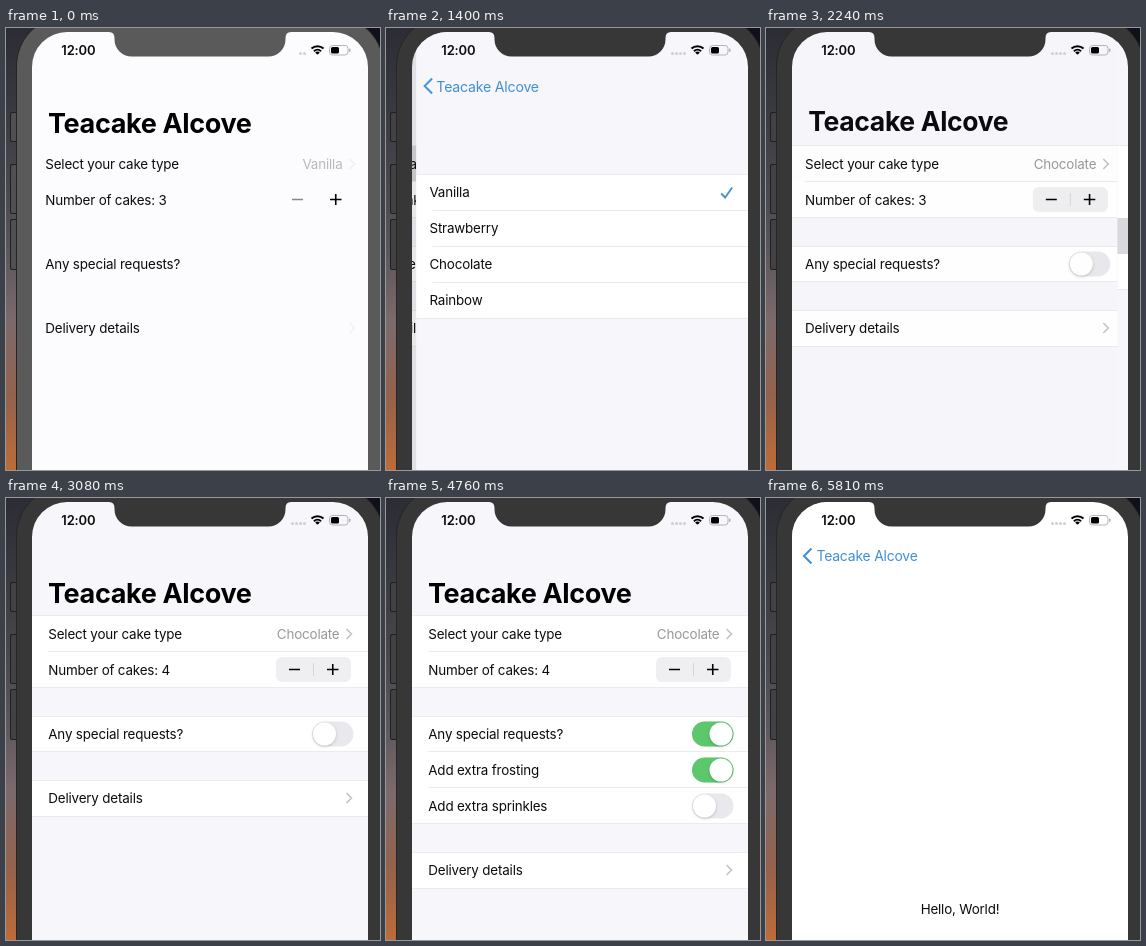
An HTML page with a canvas that plays this animation: 374x442 px, repeating every 5.95 s.

```html
<!DOCTYPE html>
<html lang="en">
<head>
<meta charset="utf-8">
<title>Order form demo</title>
<style>
html, body { margin: 0; width: 100%; height: 100%; overflow: hidden; }
canvas { display: block; }
</style>
</head>
<body>
<canvas id="stage" width="374" height="442"></canvas>
<script>
const ctx = document.getElementById('stage').getContext('2d');
const LOOP = 5950, STEP = 70;
const LEFT = 26, TOP = 4, WIDTH = 336, RIGHT = LEFT + WIDTH;
const TITLE = 'Teacake Alcove', FLAVOURS = ['Vanilla', 'Strawberry', 'Chocolate', 'Rainbow'];
const BLUE = '#3f8fd4', GROUPED = '#f7f6fb', LINE = '#ebeaee', SELECTED = '#d9d8dd';

const mix = (a, b, k) => a + (b - a) * k;
const clamp = v => Math.max(0, Math.min(1, v));
const ease = v => { v = clamp(v); return v * v * (3 - 2 * v); };
// Critically damped slide used by page transitions
const slide = ms => ms <= 0 ? 0 : ms >= 520 ? 1 : Math.min(1, 1.009 * (1 - (1 + .013 * ms) * Math.exp(-.013 * ms)));

function rect(x, y, w, h, color) {
  ctx.fillStyle = color;
  ctx.fillRect(x, y, w, h);
}

function pill(x, y, w, h, r, color) {
  ctx.fillStyle = color;
  ctx.beginPath();
  ctx.roundRect(x, y, w, h, r);
  ctx.fill();
}

function line(points, color, width) {
  ctx.strokeStyle = color;
  ctx.lineWidth = width;
  ctx.beginPath();
  points.forEach(([x, y]) => ctx.lineTo(x, y));
  ctx.stroke();
}

// y is the middle of the capital letters
function text(str, x, y, { size = 13.4, weight = 400, color = '#0c0c0c', align = 'left' } = {}) {
  ctx.font = `${weight} ${size}px Inter, sans-serif`;
  ctx.letterSpacing = `${-.013 * size}px`;
  ctx.textAlign = align;
  ctx.fillStyle = color;
  ctx.fillText(str, x, y + .364 * size);
}

function faded(alpha, draw) {
  ctx.save();
  ctx.globalAlpha *= clamp(alpha);
  draw();
  ctx.restore();
}

function section(y, h) {
  rect(LEFT, y - 1, WIDTH, h + 2, LINE);
  rect(LEFT, y, WIDTH, h, '#fff');
}

const divider = y => rect(42, y, RIGHT - 42, 1, LINE);
const chevron = (x, y, color) => line([[x - 2.5, y - 5], [x + 2.5, y], [x - 2.5, y + 5]], color, 1.6);

function toggle(y, on) {
  pill(306, y - 12.5, 41.5, 25, 12.5, '#e9e8ec');
  faded(on, () => pill(306, y - 12.5, 41.5, 25, 12.5, '#5dc76c'));
  ctx.save();
  ctx.shadowColor = 'rgba(0,0,0,.2)';
  ctx.shadowBlur = 3;
  ctx.shadowOffsetY = 1;
  pill(mix(307, 323.5, on), y - 11.5, 23, 23, 11.5, '#fff');
  ctx.restore();
}

function stepper(dx, flat, press) {
  if (!flat) {
    pill(270, 159, 75, 25, 6, '#efeff1');
    faded(press, () => pill(307.5, 159, 37.5, 25, [0, 6, 6, 0], '#d2d2d6'));
    rect(307, 165, 1, 13, '#d4d4d8');
  }
  line([[283 + dx, 171.5], [294 + dx, 171.5]], flat ? '#888' : '#000', 1.5);
  line([[321 + dx, 171.5], [332.5 + dx, 171.5]], '#000', 1.6);
  line([[326.75 + dx, 166], [326.75 + dx, 177]], '#000', 1.6);
}

function orderPage(t, flat, p) {
  const dx = flat ? 3 : 0, x = 42.3 - dx, grow = ease((t - 3500) / 400);
  const detailsY = 300 + 72 * grow, arrow = flat ? '#f0f0f3' : '#c4c4c8';
  rect(LEFT, TOP, WIDTH, 442, flat ? '#fcfcfe' : GROUPED);
  if (!flat) {
    section(118, 71);
    section(219, 34 + 72 * grow);
    section(detailsY - 17, 35);
    const picked = t < 1820 ? 1 : t < 2400 ? p : 0;
    faded(picked, () => rect(LEFT, 118, WIDTH, 35, SELECTED));
    if (t >= 5110) rect(LEFT, 354, WIDTH, 36, SELECTED);
    divider(153);
  }
  text('Select your cake type', x, 136);
  text(FLAVOURS[t < 1820 ? 0 : 2], 333.5 + dx, 136, { color: flat ? '#b8b8bc' : '#98989d', align: 'right' });
  chevron(343 + dx, 136, arrow);
  text('Number of cakes: ' + (t < 2870 ? 3 : 4), x, 172);
  stepper(dx, flat, t < 2870 ? 0 : 1 - (t - 2870) / 210);
  text('Any special requests?', x, 236);
  if (!flat) toggle(236, ease((t - 3450) / 280));

  if (grow) {
    ctx.save();
    ctx.beginPath();
    ctx.rect(LEFT, 218, WIDTH, 36 + 72 * grow);
    ctx.clip();
    faded(grow, () => {
      divider(253);
      divider(289);
      text('Add extra frosting', x, 272);
      text('Add extra sprinkles', x, 308);
      toggle(272, ease((t - 4080) / 300));
      toggle(308, 0);
    });
    ctx.restore();
  }
  text('Delivery details', x, detailsY);
  chevron(343 + dx, detailsY, arrow);
}

function flavourPage(t) {
  const settled = t >= 1540, top = settled ? 118 : 147, x = settled ? 42.5 : 39.3;
  const chosen = t < 1820 ? 0 : 2;
  rect(LEFT, TOP, WIDTH, 442, GROUPED);
  section(top, 143);
  FLAVOURS.forEach((name, i) => {
    const y = top + 17.5 + 36 * i;
    if (i) divider(y - 18.5);
    if (t >= 1820 && i === chosen) rect(LEFT, y - 17.5, WIDTH, 36, SELECTED);
    text(name, x, y);
    if (i === chosen) line([[331, y + 1], [335, y + 5], [342, y - 5]], BLUE, 1.8);
  });
}

function helloPage() {
  rect(LEFT, TOP, WIDTH, 442, '#fff');
  text('Hello, World!', 194, 411, { align: 'center' });
}

function navTitle(p, q) {
  const x = mix(42, 50.5, q), y = mix(95, 58, q), size = mix(27, 13.9, q);
  const link = p < .8 ? { weight: 700, color: '#6c8fc4' } : { color: BLUE };
  faded(1 - p, () => text(TITLE, x, y, { size, weight: 700, color: '#000' }));
  faded(p, () => text(TITLE, x, y, { size, ...link }));
  const bx = 50 * (1 - p);
  faded((p - .8) / .2, () => line([[45.5 + bx, 50.5], [38 + bx, 58], [45.5 + bx, 65.5]], BLUE, 2));
}

function statusBar(flat) {
  text('12:00', 55.3, 22.5, { size: 13, weight: 600 });
  for (let i = flat ? 2 : 0; i < 4; i++) pill(285 + 4 * i, 24, 3, 3, 1.5, '#d0d0d4');
  // Wi-Fi arcs
  [[2, 2.8], [5.2, 2], [8.8, 2]].forEach(([r, w]) => {
    ctx.strokeStyle = '#000';
    ctx.lineWidth = w;
    ctx.beginPath();
    ctx.arc(311.5, 27, r, -Math.PI * .74, -Math.PI * .26);
    ctx.stroke();
  });
  ctx.strokeStyle = '#b4b4b8';
  ctx.lineWidth = 1;
  ctx.beginPath();
  ctx.roundRect(323.5, 17.5, 18.5, 9.5, 3);
  ctx.stroke();
  pill(325, 19, 8, 6.5, 1.5, '#000');
  pill(343, 20.5, 1.5, 3.5, 1, '#b4b4b8');
}

function phone(flat) {
  const wall = ctx.createLinearGradient(0, 0, 0, 442);
  ['#2c2c34', '#38383f', '#46464c', '#5a565b', '#7d6a6c', '#94624c', '#bd6c38']
    .forEach((c, i) => wall.addColorStop(i / 6, c));
  rect(0, 0, 374, 442, wall);
  rect(187, 0, 187, 60, '#10101a');
  [[84, 30], [136, 50], [191, 51]].forEach(([y, h]) => {
    pill(4, y, 9, h, 2, '#202022');
    pill(5, y + 1, 8, h - 2, 1.5, flat ? '#505052' : '#424244');
  });
  pill(10, -12, 368, 600, 50, '#262628');
  pill(11, -11, 366, 600, 49, flat ? '#5a5a5a' : '#373737');
}

function notch(color) {
  ctx.fillStyle = color;
  ctx.beginPath();
  ctx.moveTo(103, 3);
  ctx.lineTo(103, 4);
  ctx.quadraticCurveTo(108.5, 4, 108.5, 10);
  ctx.arcTo(108.5, 28.5, 126, 28.5, 17);
  ctx.arcTo(279.5, 28.5, 279.5, 11, 17);
  ctx.lineTo(279.5, 10);
  ctx.quadraticCurveTo(279.5, 4, 285, 4);
  ctx.lineTo(285, 3);
  ctx.fill();
}

function draw(t) {
  const flat = t < 910;
  let p = 0;
  if (t >= 5110) p = slide(t - 5106);
  else if (t >= 1820) p = 1 - slide(t - 1855);
  else if (t >= 1050) p = slide(t - 956.5);
  // The title lags slightly behind the pages
  const popping = t >= 1820 && t < 5110;
  const q = popping ? 1 - (1 - p) ** 1.2 : p ** 1.2;

  phone(flat);
  ctx.save();
  ctx.beginPath();
  ctx.roundRect(LEFT, TOP, WIDTH, 600, 35);
  ctx.clip();

  ctx.save();
  ctx.translate(-.3 * WIDTH * p, 0);
  orderPage(t, flat, p);
  ctx.restore();
  if (p) {
    rect(LEFT, TOP, WIDTH, 442, `rgba(0,0,0,${.09 * p})`);
    ctx.save();
    ctx.translate(WIDTH * (1 - p), 0);
    t < 5110 ? flavourPage(t) : helloPage();
    ctx.restore();
  }
  navTitle(p, q);
  statusBar(flat);
  ctx.restore();
  notch(flat ? '#5a5a5a' : '#373737');
}

function tick() {
  const t = performance.now() % LOOP;
  draw(Math.floor(t / STEP) * STEP);
  requestAnimationFrame(tick);
}
tick();
</script>
</body>
</html>
```
